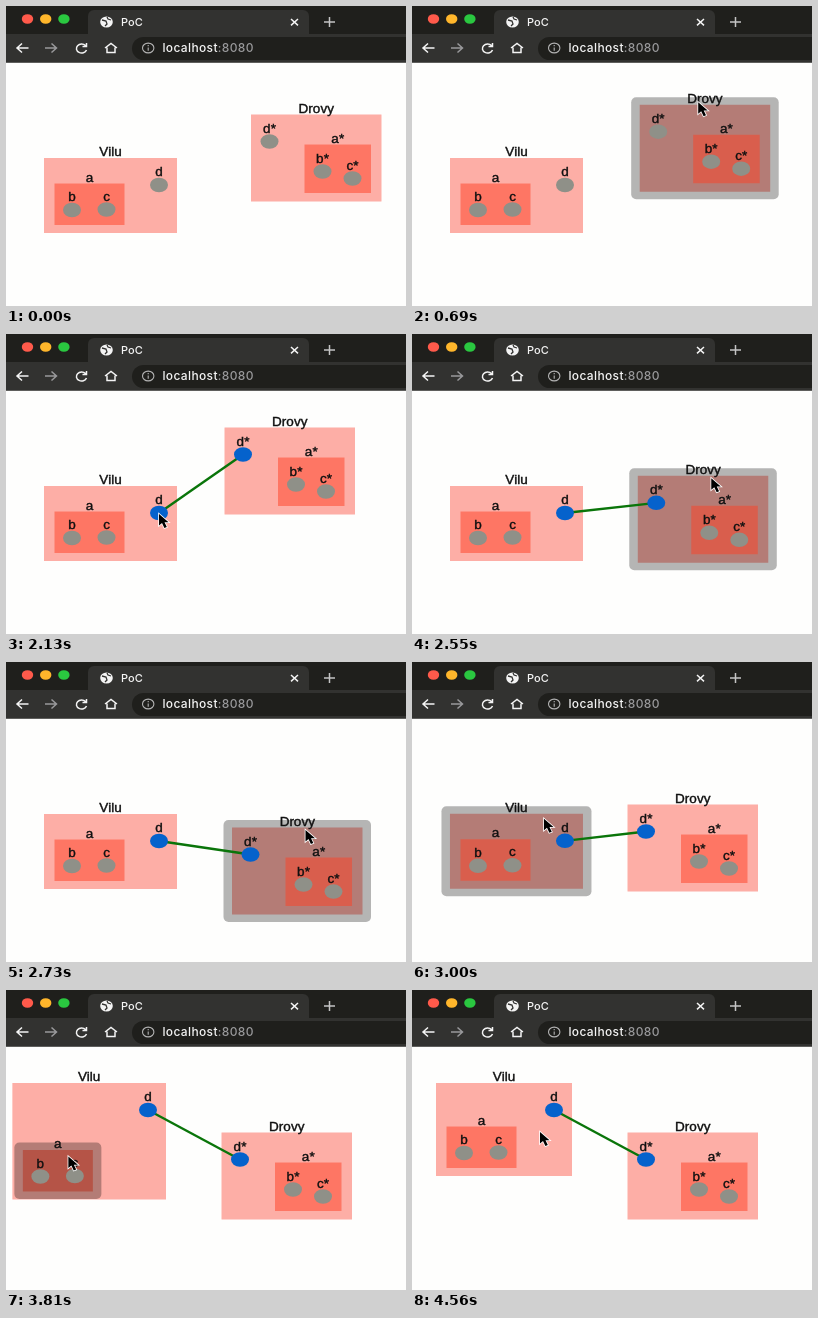
Recreate the animation shown at these times as an HTML page with a canvas. Size 400x300 px, loop 4830 ms.

```html
<!DOCTYPE html>
<html lang="en">
<head>
<meta charset="utf-8">
<title>PoC</title>
<style>
html, body { margin: 0; width: 400px; height: 300px; overflow: hidden; }
canvas { display: block; }
</style>
</head>
<body>
<canvas id="stage" width="400" height="300"></canvas>
<script>
const ctx = document.getElementById('stage').getContext('2d');
const LOOP = 4830;
const LIGHT = '#f4f4f4', DIM = '#99999b', BAR = '#323230', DARK = '#1f1f1c';
const PINK = '#fdaea6', ORANGE = 'rgba(255,64,36,.5)', SHADE = 'rgba(0,0,0,.29)';

// Pointer moves: start, end, dx, dy and the item held meanwhile
const moves = [
  [300, 480, -80.5, -112],
  [510, 810, -26.5, -15, 'right'],
  [930, 1320, -39, 30],
  [1350, 1430, 0, 0, 'd*'],
  [1500, 1860, -85, 59],
  [1890, 1970, 0, 0, 'd'],
  [2130, 2370, 139, -84],
  [2440, 2640, 12.5, 83, 'right'],
  [2640, 2880, -15.5, -34, 'right'],
  [2890, 2985, -157, 12],
  [2990, 3330, -11, -59, 'left'],
  [3360, 3435, -38, 27],
  [3440, 3740, -24, 46, 'a'],
  [3740, 4020, 21, -28, 'a'],
  [4230, 4560, 48, -1]
];

function ease(t, from, to) {
  const k = Math.max(0, Math.min(1, (t - from) / (to - from)));
  return k * k * (3 - 2 * k);
}

// Total travel of an item, or of the pointer when no id is given
function travel(t, id) {
  let x = 0, y = 0;
  for (const [from, to, dx, dy, item] of moves) {
    if (id && id !== item) continue;
    const k = ease(t, from, to);
    x += dx * k;
    y += dy * k;
  }
  return [x, y];
}

const held = (id, t) => moves.some(m => m[4] === id && t >= m[0] && t < m[1]);
const pressed = (id, t) => moves.some(m => m[4] === id && t >= m[0]);

function rect(x, y, w, h, fill, r = 0) {
  ctx.fillStyle = fill;
  ctx.beginPath();
  ctx.roundRect(x, y, w, h, r);
  ctx.fill();
}

function oval(x, y, rx, ry, fill) {
  ctx.fillStyle = fill;
  ctx.beginPath();
  ctx.ellipse(x, y, rx, ry, 0, 0, 7);
  ctx.fill();
}

function text(s, x, y, font, fill, align = 'left') {
  ctx.font = font;
  ctx.fillStyle = fill;
  ctx.textAlign = align;
  ctx.fillText(s, x, y);
}

function stroke(d, color, width = 1.5) {
  ctx.strokeStyle = color;
  ctx.lineWidth = width;
  ctx.stroke(new Path2D(d));
}

function label(s, x, y) {
  text(s, x, y, '13.5px "Liberation Sans", Arial, sans-serif', '#111', 'center');
  ctx.strokeStyle = '#111';
  ctx.lineWidth = 0.4;
  ctx.strokeText(s, x, y);
}

function box(name, l, t, r, b, fill, active) {
  rect(l, t, r - l, b - t, fill);
  if (active) rect(l - 8.5, t - 7.5, r - l + 17, b - t + 15, SHADE, 5);
  label(name, (l + r) / 2, t - 2);
}

function node(name, x, y, blue, active) {
  oval(x, y, 9, 7.3, blue ? '#0562cc' : '#8f9088');
  if (active) rect(x - 17.5, y - 14.5, 35, 29, SHADE, 5);
  label(name, x, y - 9);
}

function browser() {
  rect(0, 0, 400, 56.5, DARK);
  rect(82, 4, 221, 30, BAR, 6);
  rect(0, 28, 400, 28.5, BAR);
  rect(126, 31, 290, 23, DARK, 11.5);
  ['#ff5a4b', '#ffb62b', '#2ac740'].forEach((c, i) => oval(21.5 + i * 18.2, 13, 5.7, 4.8, c));

  oval(100.5, 16, 6.3, 5.6, LIGHT);
  stroke('M96 14l4 1 1 3-2 2M101 11l1 2 3 1', BAR, 1.3);
  text('PoC', 115, 20, '500 11px Inter, sans-serif', LIGHT);
  stroke('M285 13l7 6.4M292 13l-7 6.4', LIGHT);
  stroke('M318 16h11M323.5 11v10', '#c4c4c4');

  stroke('M22.5 42H11M16 37.5L11 42l5 4.5', LIGHT);
  stroke('M39 42h11.5M45.5 37.5l5 4.5-5 4.5', DIM);
  stroke('M79.5 39.5A5.2 4.5 0 1 0 80.5 44M80.5 37v3.5h-4', LIGHT);
  stroke('M99 42l6-4.5 6 4.5M101 41.5v5h8v-5', LIGHT);
  stroke('M136.5 42a5.7 4.9 0 1 0 11.4 0a5.7 4.9 0 1 0-11.4 0M142.2 41.5v3.2M142.2 39v1.2', '#b4b4b4', 1.1);

  const font = '500 12px Inter, sans-serif';
  ctx.letterSpacing = '.35px';
  text('localhost', 156.5, 46.3, font, LIGHT);
  text(':8080', 156.5 + ctx.measureText('localhost').width, 46.3, font, DIM);
  ctx.letterSpacing = '0px';
}

function arrow(x, y) {
  const shape = new Path2D('M0 0V11.5L3 9l2.4 5 2.4-1L5.5 8.2H9.5Z');
  ctx.save();
  ctx.translate(x, y);
  ctx.lineWidth = 1.6;
  ctx.strokeStyle = '#fff';
  ctx.stroke(shape);
  ctx.fillStyle = '#000';
  ctx.fill(shape);
  ctx.restore();
}

function draw(t) {
  const [rx, ry] = travel(t, 'right');
  const [lx, ly] = travel(t, 'left');
  const [dx, dy] = travel(t, 'a');
  const ax = lx + dx, ay = ly + dy;
  const d = [153 + lx, 179 + ly], e = [263.5 + rx, 135.5 + ry];
  const linked = pressed('d', t);

  rect(0, 0, 400, 300, '#fefefd');
  browser();

  // The outer left box wraps both a and d
  box('Vilu', 38 + ax, 152 + ly, 171 + lx, 227 + ay, PINK, held('left', t));
  box('Drovy', 245 + rx, 108.5 + ry, 375.5 + rx, 195.5 + ry, PINK, held('right', t));
  box('a', 48.5 + ax, 177.5 + ay, 118.5 + ax, 219 + ay, ORANGE, held('a', t));
  box('a*', 298.5 + rx, 138.5 + ry, 365 + rx, 187 + ry, ORANGE);

  if (linked) stroke(`M${d}L${e}`, '#0a750a', 2.4);
  node('b', 66 + ax, 204 + ay);
  node('c', 100.5 + ax, 203.5 + ay);
  node('b*', 316.5 + rx, 165.5 + ry);
  node('c*', 346.5 + rx, 172.5 + ry);
  node('d', ...d, linked, held('d', t));
  node('d*', ...e, pressed('d*', t), held('d*', t));

  const [px, py] = travel(t);
  if (t >= 300) arrow(384 + px, 218 + py);
}

const start = performance.now();
(function tick() {
  draw((performance.now() - start) % LOOP);
  requestAnimationFrame(tick);
})();
</script>
</body>
</html>
```
